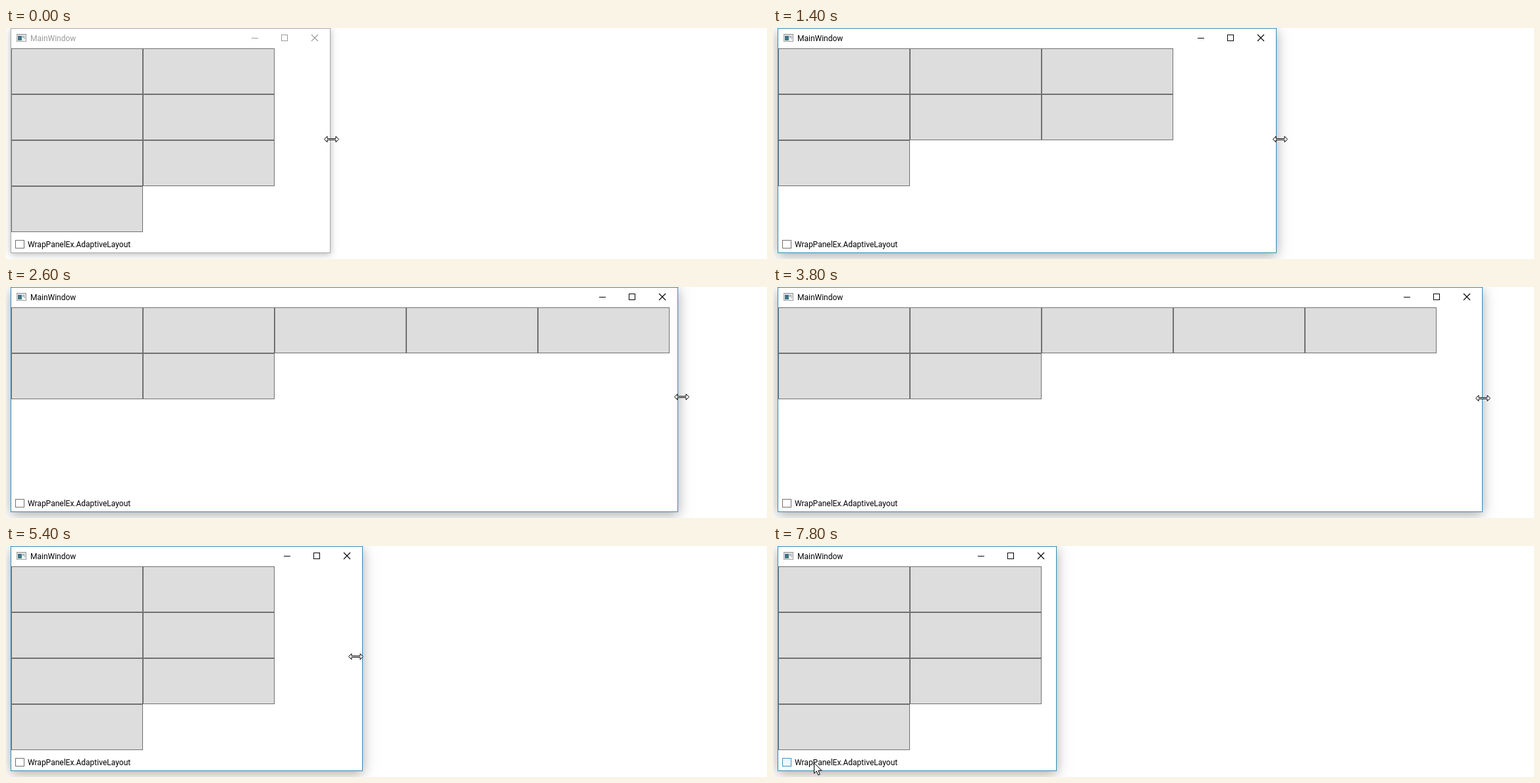
Animation of 1156x352 px, one loop 8 s. Source, as an HTML page with a canvas:

```html
<!DOCTYPE html>
<html lang="en">
<head>
<meta charset="utf-8">
<title>Wrapping panel</title>
<style>
html, body { margin: 0; width: 1156px; height: 352px; overflow: hidden; background: #fff; }
canvas { display: block; }
</style>
</head>
<body>
<canvas id="stage" width="1156" height="352"></canvas>
<script>
const ctx = document.getElementById('stage').getContext('2d');
const LOOP = 8000, STEP = 200;
const LEFT = 7, BOTTOM = 342, CELL_W = 200, CELL_H = 70, CELLS = 7;
const RELEASE = 6800, TRAVEL = 1000;

// The drag: right border, its speed in px/ms, and the pointer's lead and height
const drag = [
  { t: 200, edge: 492, speed: 0, lead: 2, y: 169 },
  { t: 1400, edge: 764, speed: .45, lead: 6, y: 169 },
  { t: 2600, edge: 1020, speed: .2, lead: 6, y: 167 },
  { t: 3600, edge: 1091, speed: 0, lead: 2, y: 169 },
  { t: 4600, edge: 811, speed: -.46, lead: -3, y: 171 },
  { t: 5400, edge: 541, speed: -.2, lead: -10, y: 168 },
  { t: 6400, edge: 430, speed: 0, lead: 2, y: 166 }
];

const lerp = (a, b, p) => a + (b - a) * p;
const smooth = p => p * p * (3 - 2 * p);

function dragAt(t) {
  const end = drag[drag.length - 1];
  t = Math.min(Math.max(t, drag[0].t), end.t);
  const i = Math.max(1, drag.findIndex(k => k.t >= t));
  const a = drag[i - 1], b = drag[i], span = b.t - a.t;
  const p = (t - a.t) / span, q = 1 - p, e = smooth(p);
  const bend = span * p * q * (a.speed * q - b.speed * p);
  const edge = Math.round(lerp(a.edge, b.edge, e) + bend);
  return { edge, x: edge + Math.round(lerp(a.lead, b.lead, e)), y: Math.round(lerp(a.y, b.y, e)) };
}

function box(x, y, w, h, fill, stroke) {
  ctx.fillStyle = stroke;
  ctx.fillRect(x, y, w, h);
  ctx.fillStyle = fill;
  ctx.fillRect(x + 1, y + 1, w - 2, h - 2);
}

function text(str, x, y, color) {
  ctx.font = '12px Roboto, "Open Sans", sans-serif';
  ctx.fillStyle = color;
  ctx.fillText(str, x, y);
}

function shape(x, y, points) {
  ctx.beginPath();
  points.forEach(([px, py]) => ctx.lineTo(x + px, y + py));
  ctx.closePath();
  ctx.fillStyle = '#fff';
  ctx.strokeStyle = '#000';
  ctx.lineWidth = 1;
  ctx.fill();
  ctx.stroke();
}

function drawFrame(edge, active) {
  const w = edge - LEFT + 1, h = BOTTOM + 1;
  ctx.save();
  ctx.shadowColor = active ? 'rgba(0,0,0,.34)' : 'rgba(0,0,0,.28)';
  ctx.shadowBlur = active ? 18 : 10;
  ctx.shadowOffsetY = active ? 4 : 2;
  ctx.fillStyle = '#fff';
  ctx.fillRect(LEFT, 0, w, h);
  ctx.restore();
  box(LEFT, 0, w, h, '#fff', active ? '#358bb3' : '#a9a9a9');
}

function drawIcon() {
  box(16, 9, 15, 12, '#f2f2f2', '#a0a0a0');
  ctx.fillStyle = '#c4c8cc';
  ctx.fillRect(17, 10, 13, 1);
  const pic = ctx.createLinearGradient(18, 12, 24, 19);
  pic.addColorStop(0, '#3f6690');
  pic.addColorStop(1, '#3f8579');
  ctx.fillStyle = pic;
  ctx.fillRect(18, 12, 6, 7);
  ctx.fillStyle = '#8fa3b5';
  ctx.fillRect(25, 12, 2, 3);
  ctx.fillRect(28, 12, 1, 5);
}

function drawTitleBar(edge, active) {
  const color = active ? '#000' : '#999';
  drawIcon();
  text('MainWindow', 37, 20, color);
  ctx.fillStyle = color;
  ctx.fillRect(edge - 119, 15, 10, 1);
  ctx.strokeStyle = color;
  ctx.lineWidth = 1;
  ctx.strokeRect(edge - 73.5, 10.5, 9, 9);
  const x = edge - 28;
  ctx.lineWidth = 1.1;
  ctx.beginPath();
  ctx.moveTo(x, 10);
  ctx.lineTo(x + 10, 20);
  ctx.moveTo(x + 10, 10);
  ctx.lineTo(x, 20);
  ctx.stroke();
}

function drawCells(edge, tip) {
  const cols = Math.floor((edge - LEFT - 1) / CELL_W);
  for (let i = 0; i < CELLS; i++) {
    const x = LEFT + 1 + (i % cols) * CELL_W;
    const y = 31 + Math.floor(i / cols) * CELL_H;
    const hover = tip && tip.x >= x && tip.x < x + CELL_W && tip.y >= y && tip.y < y + CELL_H;
    box(x, y, CELL_W, CELL_H, hover ? '#bee6fd' : '#ddd', hover ? '#3c7fb1' : '#707070');
  }
}

function drawCheck(tip) {
  const hover = tip && tip.y > 322 && tip.y < 338 && tip.x > 13 && tip.x < 188;
  box(14, 323, 14, 13, hover ? '#f0f8ff' : '#fff', hover ? '#3d93bb' : '#707070');
  text('WrapPanelEx.AdaptiveLayout', 33, 334, '#000');
}

function drawResize(x, y) {
  const top = [[-11, 0], [-6.5, -4.5], [-6.5, -1], [6.5, -1], [6.5, -4.5], [11, 0]];
  const bottom = top.slice(1, 5).reverse().map(([px, py]) => [px, -py]);
  shape(x + .5, y + .5, top.concat(bottom));
}

function drawArrow(x, y) {
  shape(x + .5, y + .5, [[0, 0], [0, 16], [3.7, 12.5], [6.3, 18.5], [8.8, 17.4], [6.3, 11.6], [11.3, 11.6]]);
}

function draw(time) {
  const t = Math.floor(time / STEP) * STEP;
  const active = t >= 200;
  const { edge, x, y } = dragAt(t);
  let tip = null;
  if (t > RELEASE) {
    const e = smooth((t - RELEASE) / TRAVEL);
    tip = { x: Math.round(lerp(x, 62, e)), y: Math.round(lerp(y, 330, e)) };
  }
  ctx.fillStyle = '#fff';
  ctx.fillRect(0, 0, 1156, 352);
  drawFrame(edge, active);
  drawTitleBar(edge, active);
  drawCells(edge, tip);
  drawCheck(tip);
  if (tip) drawArrow(tip.x, tip.y);
  else drawResize(x, y);
}

const start = performance.now();
function tick() {
  draw((performance.now() - start) % LOOP);
  requestAnimationFrame(tick);
}
tick();
</script>
</body>
</html>
```
